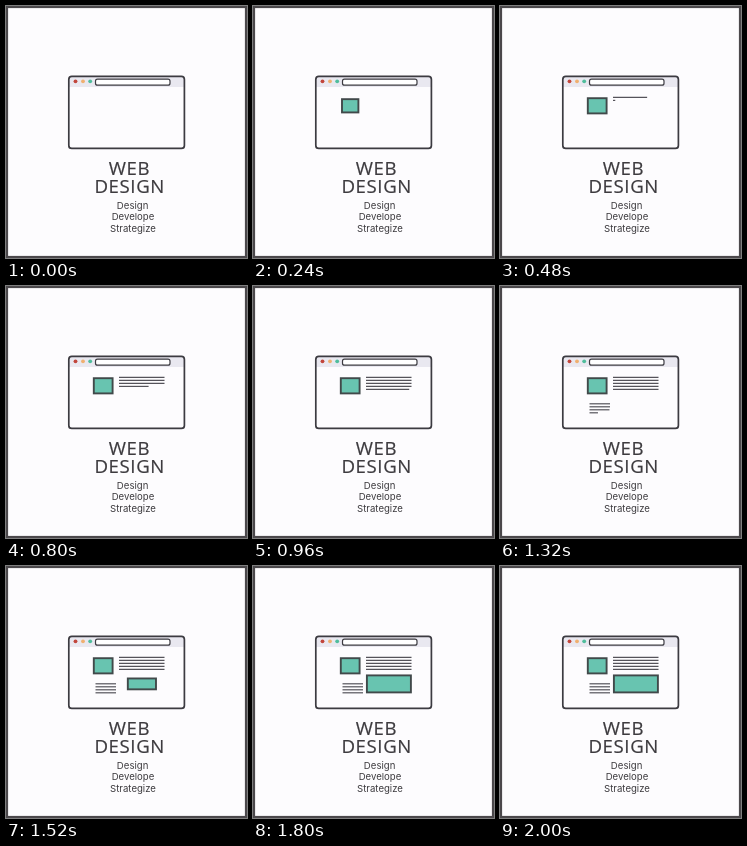
Animation of 241x252 px, one loop 2.04 s. Source, as an HTML page:

```html
<!DOCTYPE html>
<html lang="en">
<head>
<meta charset="utf-8">
<title>Web design</title>
<style>
  html, body { margin: 0; width: 100%; height: 100%; overflow: hidden; }
  svg { display: block; width: 241px; height: 252px; background: #fdfcfe; }
  text { fill: #3d3b3f; text-anchor: middle; }
  .title { font: 18.6px "Open Sans", sans-serif; letter-spacing: .6px; stroke: #3d3b3f; stroke-width: .2; }
  .sub { font: 9.6px Inter, sans-serif; }
  .block { fill: #68c4b0; stroke: #41494a; stroke-width: 1.9; }
  .line { stroke: #55535a; stroke-width: 1.2; }
</style>
</head>
<body>
<svg id="stage" viewBox="0 0 241 252">
  <rect x="1" y="1" width="239" height="250" fill="none" stroke="#4b484b" stroke-width="2.2"/>
  <rect x="62.8" y="70.4" width="115.6" height="72" rx="3" fill="#fdfcfe"/>
  <path d="M62.8 81V73.4a3 3 0 0 1 3-3H175.4a3 3 0 0 1 3 3V81z" fill="#e9e8f0"/>
  <rect x="62.8" y="70.4" width="115.6" height="72" rx="3" fill="none" stroke="#3c3b41" stroke-width="1.7"/>
  <circle cx="69.5" cy="75.3" r="1.9" fill="#c2463c"/>
  <circle cx="77" cy="75.3" r="1.9" fill="#f0b070"/>
  <circle cx="84.2" cy="75.3" r="1.9" fill="#50bd9c"/>
  <rect x="89.5" y="73.2" width="74.5" height="6" rx="2" fill="#fff" stroke="#3c3b41" stroke-width="1.2"/>
  <text class="title" x="123.5" y="169">WEB</text>
  <text class="title" x="123.7" y="187">DESIGN</text>
  <text class="sub" x="126.6" y="203.4">Design</text>
  <text class="sub" x="127" y="214.4">Develope</text>
  <text class="sub" x="127" y="226.4">Strategize</text>
</svg>
<script>
const LOOP = 2040, stage = document.getElementById('stage'), parts = [];

function add(tag, cls, draw) {
  const el = document.createElementNS('http://www.w3.org/2000/svg', tag);
  el.setAttribute('class', cls);
  stage.append(el);
  parts.push({ el, draw });
}
function set(el, attrs) {
  for (const k in attrs) el.setAttribute(k, attrs[k]);
}
const progress = (t, start, dur) => Math.min(1, Math.max(0, (t - start) / dur));
const easeOut = p => 1 - (1 - p) ** 2;

// A block grows from its centre
function block(cx, cy, w, h, start, dur) {
  add('rect', 'block', (el, t) => {
    const s = easeOut(progress(t, start, dur));
    set(el, {
      x: cx - w * s / 2, y: cy - h * s / 2, width: w * s, height: h * s,
      visibility: s ? 'visible' : 'hidden'
    });
  });
}

// Lines are written from left to right, one after another
function lines(count, x, y, w, start, gap) {
  for (let i = 0; i < count; i++) {
    add('line', 'line', (el, t) => {
      const p = progress(t, start + i * gap, 160);
      set(el, {
        x1: x, x2: x + w * p, y1: y + i * 3, y2: y + i * 3,
        visibility: p ? 'visible' : 'hidden'
      });
    });
  }
}

block(97.2, 99.8, 18.8, 15.2, 60, 280);
lines(5, 113, 91.4, 45.5, 360, 112);
lines(4, 89.5, 117.8, 20.5, 984, 90);
block(135.9, 117.9, 44, 17, 1424, 240);

function frame(now) {
  const t = Math.floor(now % LOOP / 40) * 40;
  for (const { el, draw } of parts) draw(el, t);
  requestAnimationFrame(frame);
}
frame(performance.now());
</script>
</body>
</html>
```
